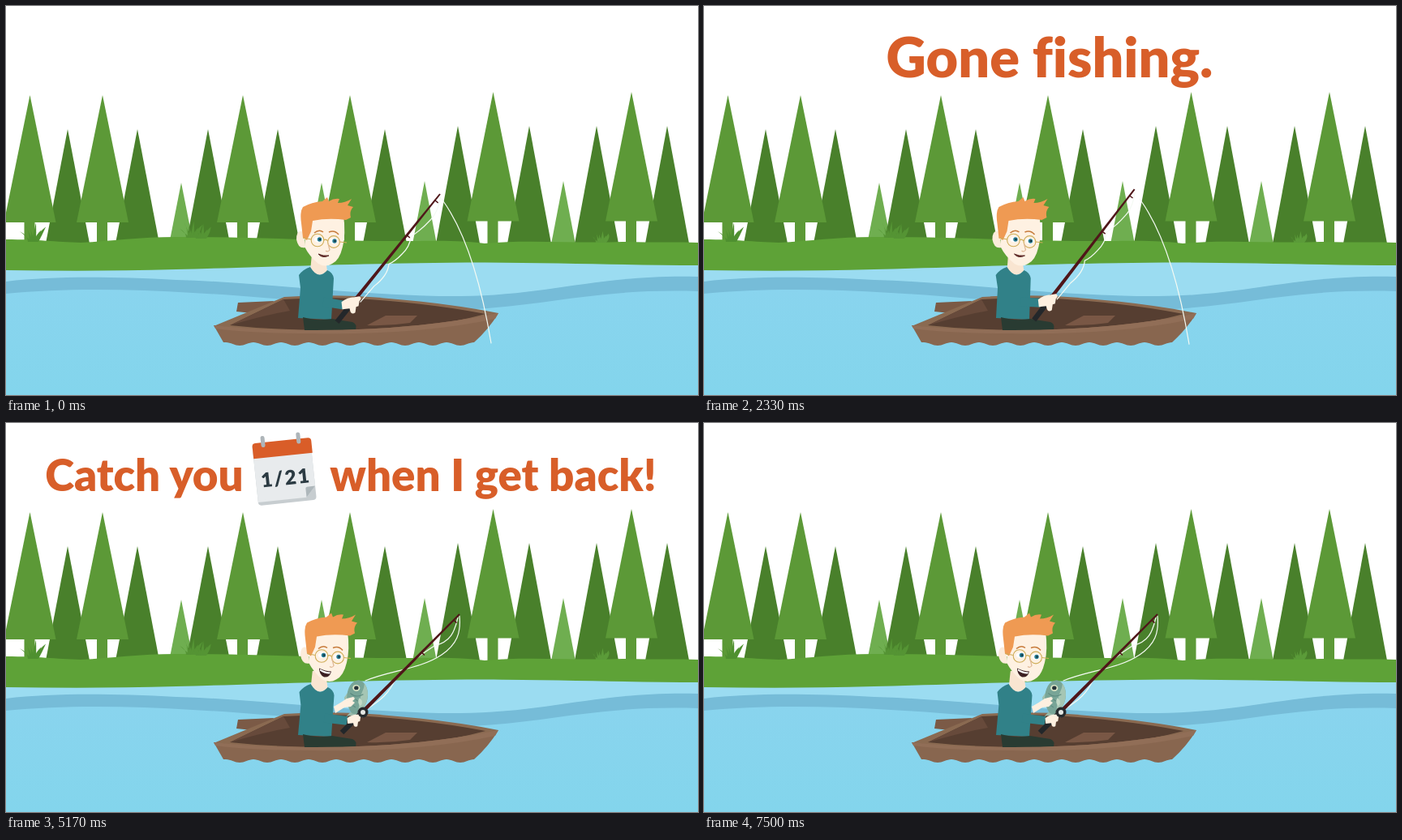
Animation of 853x480 px, one loop 7580 ms. Source, as an HTML page:

```html
<!DOCTYPE html>
<html lang="en">
<head>
<meta charset="utf-8">
<title>Gone fishing</title>
<style>
  html, body { margin: 0; width: 100%; height: 100%; overflow: hidden; background: #fff; }
  svg { display: block; width: 100vw; height: 100vh; }
  .title { font-family: Lato, Inter, sans-serif; font-weight: 900; fill: #d85e29; text-anchor: middle;
    font-variant-ligatures: none; }
  .thread { fill: none; stroke: #f4faf3; stroke-width: 1.2; stroke-linecap: round; stroke-linejoin: round; }
</style>
</head>
<body>
<svg viewBox="0 0 853 480" preserveAspectRatio="none">
  <defs>
    <clipPath id="wipe"><rect id="wipeBox" y="0" height="110"/></clipPath>
    <clipPath id="above"><rect width="853" height="417"/></clipPath>
    <linearGradient id="lake" x2="0" y2="1">
      <stop offset="0" stop-color="#89d4ee"/><stop offset="1" stop-color="#83d5ec"/>
    </linearGradient>
    <g id="fish">
      <path d="M-2 15L-9 25Q-3 22 0 25Q5 21 9 25L4 15Z" fill="#98b9aa"/>
      <path d="M-8 -8L-13 2L-11 11L-5 14Z" fill="#9fc0ae"/>
      <path d="M1 -21C8 -20 12 -11 12 -2C12 9 7 17 3 21H-3C-9 14 -11 4 -10 -5C-9 -14 -5 -20 1 -21Z" fill="#78a597"/>
      <path d="M7 -18C12 -11 13 -2 11 6C9 13 6 18 3 21C4 11 3 4 5 -4C6 -9 8 -13 7 -18Z" fill="#a5c6b4"/>
      <path d="M-7 -4Q0 2 7 -4M-6 5l3 2m2 -4l3 2m-5 6l3 2" fill="none" stroke="#5d8b80"/>
      <path d="M3 1Q9 5 5 11Q1 7 3 1Z" fill="#c3dac7"/>
      <circle cx="-1" cy="-11" r="4" fill="#dce6c6"/><circle cx="-1" cy="-11" r="2.4" fill="#26343a"/>
    </g>
  </defs>

  <rect width="853" height="480" fill="#fff"/>
  <g id="trees"></g>
  <path d="M0 288C40 288 60 291 92 292C130 290 165 285 210 285C290 285 350 288 410 289C490 292 540 287 590 293C640 288 700 293 760 291C800 292 830 291 853 292V340H0Z" fill="#5ea237"/>
  <g id="tufts"></g>
  <path d="M0 326C70 327 140 327 210 325C330 322 440 317 590 316.500C690 317 780 320 853 320V480H0Z" fill="#9bdcf1"/>
  <path d="M0 340C60 333 130 334 210 338C320 341 430 358 560 358C670 357 730 331 853 334V480H0Z" fill="#76bcd8"/>
  <path d="M0 355C70 348 150 349 230 354C340 359 430 374 550 375C660 373 720 348 853 352V480H0Z" fill="url(#lake)"/>

  <g id="boat">
    <path d="M286 366L330 364L322 381L284 377Z" fill="#7b5a46"/>
    <path d="M256 395L343 359Q385 356 432 358Q530 364 607 379Q560 396 480 402H300Z" fill="#8a6a51"/>
    <path d="M276 394L342 362Q390 359 434 361Q525 367 591 380Q530 397 440 399Q350 402 276 394Z" fill="#563e31"/>
    <path d="M276 394L342 362L350 376Q320 381 276 394Z" fill="#674a3b"/>
    <path d="M445 394L468 382H507L498 391Q472 395 445 394Z" fill="#795745"/>
  </g>

  <g id="body">
    <path d="M377 306H393L396 327Q386 336 375 327Z" fill="#f9e5d1"/>
    <path d="M375 322Q385 339 396 326Q403 329 404 336L401 387L360 385L363 348L361 332Q366 325 375 322Z" fill="#318188"/>
  </g>
  <path d="M366 384Q382 389 402 386L427 390Q433 392 431 400L368 400Z" fill="#293b32"/>
  <path id="hull" fill="#88664f"/>
  <path d="M256 394Q300 399 370 400Q500 401 607 379L603 386Q510 406 380 404Q305 404 258 398Z" fill="#916e57"/>

  <g id="head">
    <path d="M367 279Q358 275 358 288Q360 300 369 298Z" fill="#fcecdb"/>
    <path d="M371 258H416Q419 282 415 297Q411 314 402 318Q394 323 385 318Q374 309 368 297Z" fill="#fef1e2"/>
    <path d="M366 286L364 268Q362 254 366 248Q377 242 390 241L396 236L398 241Q404 237 411 238L409 243Q418 243 426 238L421 246L428 248Q423 253 425 261L419 264Q397 261 378 265L376 278L371 289Z" fill="#ef9a53"/>
    <path d="M380 280Q386 275 391 279M398 279Q405 276 410 282" fill="none" stroke="#c77b3b" stroke-width="1.6"/>
    <g fill="#fff"><ellipse cx="385" cy="288" rx="5" ry="3.400"/><ellipse cx="404" cy="290" rx="4.600" ry="3.400"/></g>
    <g fill="#267b92"><circle cx="386.500" cy="288" r="2.700"/><circle cx="405" cy="290" r="2.700"/></g>
    <g fill="#17333d"><circle cx="387" cy="288" r="1.200"/><circle cx="405.500" cy="290" r="1.200"/></g>
    <g fill="none" stroke="#cfad58" stroke-width="1.1">
      <circle cx="384" cy="289" r="7.800"/><circle cx="404" cy="291" r="7.400"/>
      <path d="M391.700 289Q394 287 396.700 290M376.300 288L366 286M411.400 291L420 292"/>
    </g>
    <path d="M397 293L399 301Q397 304 394 302" fill="none" stroke="#dfb795" stroke-width="1.2"/>
    <path id="smile" d="M385 306Q390 312 398 308Q391 309 385 306Z" fill="#6b2b28" stroke="#5a2926"/>
    <g id="grin" transform="translate(-1 3)">
      <path d="M382 301Q390 305 397 305Q395 313 388 312Q382 309 382 301Z" fill="#3c1f23"/>
      <path d="M383 302Q390 306 396 306L395 308Q388 308 383 304Z" fill="#fff"/>
    </g>
  </g>

  <path id="cast" class="thread"/>
  <g clip-path="url(#above)"><use id="bite" href="#fish"/></g>
  <g id="holdThreads" class="thread">
    <path d="M443 318C474 305 510 304 537 286C556 273 561 259 559 238"/>
    <path d="M557 240C553 258 548 270 528 275C505 290 492 300 480 316C472 334 462 342 446 352"/>
  </g>
  <path id="sleeve" fill="none" stroke="#318188" stroke-width="11"/>
  <use id="catch" href="#fish" transform="translate(432 338) rotate(5) scale(1.150 1)"/>
  <g id="rod">
    <path d="M0 -3.200H38V3.200H0Z" fill="#23272a"/>
    <path d="M36 -2.200L205 -1V1L36 2.200Z" fill="#4f1619"/>
    <path d="M139 0v5M195 0v5" stroke="#4f1619" stroke-width="1.5"/>
    <path id="slack" class="thread" d="M202 3Q186 12 173 11Q156 10 141 5Q130 12 117 10Q104 9 97 5Q85 13 64 8L38 7"/>
  </g>
  <path id="hand" d="M-12 -3Q-5 -9 4 -9L10 -10Q14 -8 10 -4L9 2L6 3L5 10Q1 13 -1 9L-2 5L-11 6Z" fill="#fef0e0"/>
  <g id="holdFront">
    <path d="M404 350Q413 345 420 340L428 338Q432 340 427 343L430 345L425 350L417 351L406 358Z" fill="#fef0e0"/>
    <circle cx="440" cy="357" r="6.500" fill="#262b2e"/><circle cx="440" cy="357" r="3" fill="#e4e7e4"/>
  </g>

  <g clip-path="url(#wipe)">
    <text id="gone" class="title" x="426" y="88" font-size="68.300">Gone fishing.</text>
    <g id="back" class="title" font-size="54.600">
      <text x="170.500" y="83.500">Catch you</text>
      <text x="600.500" y="83.500">when I get back!</text>
    </g>
  </g>
  <g id="calendar">
    <path d="M-36 -35H36V35Q36 39 32 39H-32Q-36 39 -36 35Z" fill="#c7cdd0"/>
    <path d="M-36 -35H36V22L24 35H-36Z" fill="#e8ebed"/>
    <path d="M36 22L24 35V24Q24 22 26 22Z" fill="#aeb7bb"/>
    <path d="M-36 -19V-34Q-36 -38 -32 -38H33Q37 -38 37 -34V-19Z" fill="#d95d28"/>
    <g fill="#aeb5b9"><rect x="-25" y="-46" width="5" height="14" rx="2.500"/><rect x="19" y="-46" width="5" height="14" rx="2.500"/></g>
    <text x="1" y="17" font-family="Lato, Inter, sans-serif" font-weight="900" font-size="24.500" letter-spacing="1.8" text-anchor="middle" fill="#2b3a42">1/21</text>
  </g>
</svg>
<script>
const LOOP = 7580, CATCH = 3420;
const $ = id => document.getElementById(id);
const set = (id, attrs) => { for (const k in attrs) $(id).setAttribute(k, attrs[k]); };
const show = (id, on) => set(id, { visibility: on ? 'visible' : 'hidden' });
const part = (t, a, b) => Math.max(0, Math.min(1, (t - a) / (b - a)));
const smooth = p => p * p * (3 - 2 * p);
const inOut = p => p < .5 ? 2 * p * p : 1 - 2 * (1 - p) * (1 - p);
const pop = p => 1 + 2.2 * (p - 1) ** 3 + 1.2 * (p - 1) ** 2;

function buildScenery() {
  const tree = (x, top, base, half, fill) =>
    `<path d="M${x} ${top}L${x + half} ${base}H${x - half}Z" fill="${fill}"/>`;
  let out = '';
  for (const x of [216, 389, 516, 687]) out += tree(x, x > 500 ? 216 : 218, 294, 15, '#6fae50');
  for (const x of [76, 162, 249, 335, 467, 557, 645, 728, 815])
    out += tree(x, x > 500 ? 148 : 152, 293, 27, '#49802b');
  for (const x of [29.5, 119, 292, 424, 600.5, 771]) {
    const top = x > 500 ? 106 : 110;
    out += `<rect x="${x - 7}" y="${top + 150}" width="13" height="40" fill="#5c9937"/>`;
    out += tree(x, top, x > 500 ? 265.5 : 267, 32, '#5c9937');
  }
  $('trees').innerHTML = out;

  const tuft = (x, y, size, fill) => [-1, -.6, -.2, .25, .65, 1].map((k, i) => {
    const h = size * (i % 2 ? 1 : .7) * (1.1 - .3 * Math.abs(k));
    return `<path d="M${x + k * 4 - 2} ${y}Q${x + k * 6} ${y - h * .6} ${x + k * size * .7} ${y - h}Q${x + k * 10 + 2} ${y - h * .5} ${x + k * 4 + 3} ${y}Z" fill="${fill}"/>`;
  }).join('');
  $('tufts').innerHTML = tuft(33, 291, 23, '#4f9030') + tuft(228, 286, 20, '#559434') +
    tuft(240, 287, 18, '#559434') + tuft(733, 292, 14, '#5b9b39');

  let hull = 'M256 394Q300 399 370 400Q500 401 607 379Q595 399 577 415';
  for (let i = 0; i < 9; i++) hull += 'c-6 0 -11 4 -17 4s-11 -4 -17 -4';
  set('hull', { d: hull + 'L268 415Z' });
}

// time, handle x y, tip x y, lean, thread end x y
const poses = [
  [0, 408, 390, 535, 232, 0, 598, 416],
  [1580, 406, 386, 527, 221, -4, 598, 418],
  [2720, 407, 388, 532, 228, -2, 598, 417],
  [3170, 388, 398, 467, 198, -23, 573, 405],
  [CATCH, 385, 398, 432, 163, -28, 556, 388]
];
const holding = [CATCH, 414, 382, 559, 236, 5, 0, 0];

function poseAt(t) {
  if (t >= CATCH) return holding;
  const i = poses.findIndex(p => p[0] > t);
  const a = poses[i - 1], b = poses[i];
  const p = smooth(part(t, a[0], b[0]));
  return a.map((v, k) => v + (b[k] - v) * p);
}

function drawAngler(t) {
  const [, hx, hy, tx, ty, lean, ex, ey] = poseAt(t);
  const held = t >= CATCH;
  const skew = -Math.min(lean, 1) * .6 / 61;
  set('body', { transform: `matrix(1 0 ${skew} 1 ${-skew * 386} 0)` });
  set('head', { transform: `translate(${lean} ${held ? -1.5 : 0})` });

  const len = Math.hypot(tx - hx, ty - hy), ang = Math.atan2(ty - hy, tx - hx);
  set('rod', { transform: `translate(${hx} ${hy}) rotate(${ang * 180 / Math.PI}) scale(${len / 205})` });
  const grip = held ? 22 : 28 + Math.max(0, -lean - 4) * .6;
  const gx = hx + grip * Math.cos(ang), gy = hy + grip * Math.sin(ang);
  set('hand', { transform: `translate(${gx} ${gy})` + (held ? ' scale(.75)' : '') });
  set('sleeve', { d: `M${391 + lean * .3} ${held ? 364 : 365}L${gx - 9} ${gy + 1}` });

  const pull = part(t, 2720, 2950);
  const sx = 537 + (tx - 537) * pull, sy = 238 + (ty + 4 - 238) * pull;
  const bow = 1 - pull;
  const mx = (sx + ex) / 2 + 10 * bow, my = (sy + ey) / 2 - 34 * bow;
  set('cast', { d: `M${sx} ${sy}Q${mx} ${my} ${ex} ${ey}` });
  set('bite', { transform: `translate(${ex + 13} ${ey + 15}) rotate(-40)` });
  for (const id of ['cast', 'slack']) show(id, !held);
  for (const id of ['holdThreads', 'catch', 'holdFront']) show(id, held);
  show('bite', !held && t > 2800);
  show('smile', t < 4250);
  show('grin', t >= 4250);
}

function drawTitles(t) {
  const first = t < 4420;
  const [left, right] = first ? [222, 630] : [45, 806];
  const enter = first ? part(t, 890, 1840) : part(t, 4450, 5080);
  const leave = inOut(first ? part(t, 3900, 4400) : part(t, 6850, 7400));
  const half = (right - left) / 2 * leave;
  const end = Math.min(left + (right - left) * enter, right - half);
  set('wipeBox', { x: left + half, width: Math.max(0, end - left - half) });
  show('gone', first);
  show('back', !first);

  const size = t < 6850 ? pop(part(t, 4620, 5120)) : pop(1 - part(t, 6850, 7350));
  show('calendar', t > 4620 && t < 7350 && size > 0);
  set('calendar', { transform: `translate(343 59.500) rotate(-6) scale(${Math.max(.001, size)})` });
}

function frame() {
  const t = performance.now() % LOOP;
  drawAngler(t);
  drawTitles(t);
  requestAnimationFrame(frame);
}
buildScenery();
frame();
</script>
</body>
</html>
```
